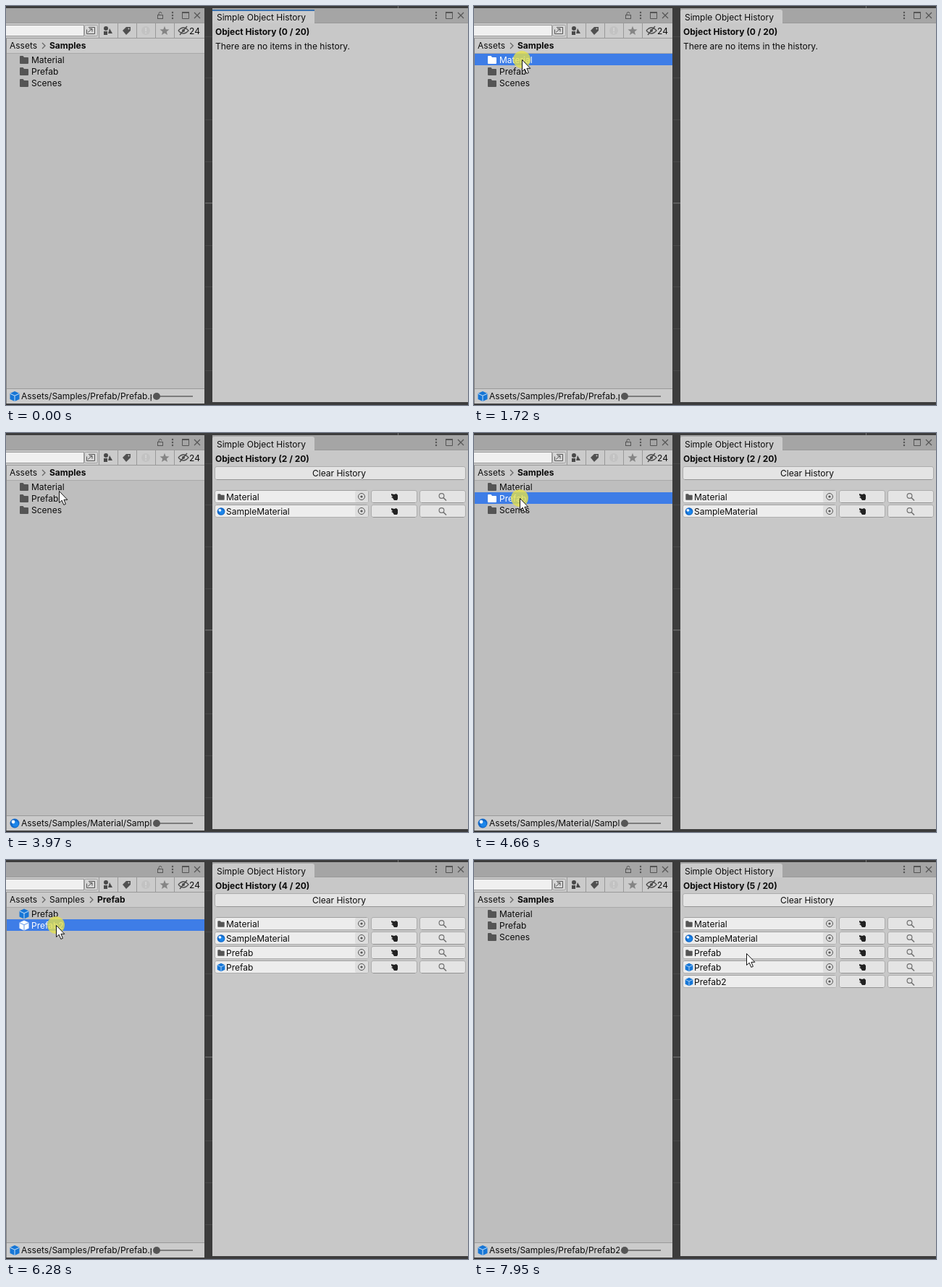
An HTML page that plays this animation: 638x552 px, repeating every 7990 ms.

```html
<!DOCTYPE html>
<html lang="en">
<head>
<meta charset="utf-8">
<title>Object history panel</title>
<style>
html, body { margin: 0; width: 100%; height: 100%; overflow: hidden; background: #3c3c3c; }
svg { display: block; }
text { font: 12px Inter, sans-serif; fill: #0b0b0b; white-space: pre; }
.b { font-weight: 700; }
.w { fill: #fff; }
</style>
</head>
<body>
<svg id="stage" width="638" height="552" viewBox="0 0 638 552">
  <defs>
    <clipPath id="pathClip"><rect x="0" y="530" width="201" height="20"/></clipPath>
  </defs>
  <g id="chrome"></g>
  <g id="view"></g>
  <circle id="press" r="12" fill="#e6e14a" opacity=".78"/>
  <path id="cursor" d="M.5 .5V16.5L4.2 13.2L6.8 19.4L9.4 18.3L6.9 12.3H11.8Z" fill="#fff" stroke="#111"/>
</svg>
<script>
const LOOP = 7990;
const $ = id => document.getElementById(id);

const rect = (x, y, w, h, fill, more = '') =>
  `<rect x="${x}" y="${y}" width="${w}" height="${h}" fill="${fill}" ${more}/>`;
const text = (x, y, s, cls = '', more = '') => `<text x="${x}" y="${y}" class="${cls}" ${more}>${s}</text>`;
const line = (d, color, width = 1) => `<path d="${d}" fill="none" stroke="${color}" stroke-width="${width}"/>`;
const shape = (d, fill) => `<path d="${d}" fill="${fill}"/>`;
const disc = (x, y, r, fill) => `<circle cx="${x}" cy="${y}" r="${r}" fill="${fill}"/>`;
const ring = (x, y, r, color, width = 1) =>
  `<circle cx="${x}" cy="${y}" r="${r}" fill="none" stroke="${color}" stroke-width="${width}"/>`;
const place = (x, y, k, s) => `<g transform="translate(${x} ${y}) scale(${k})">${s}</g>`;

// Icons are centred on the origin
const icons = {
  folder: on => shape('M-6-4.5Q-6-5.5-5-5.5H-1.5L0-3.5H5Q6-3.5 6-2.5V4.5Q6 5.5 5 5.5H-5Q-6 5.5-6 4.5Z', on ? '#fff' : '#555'),
  material: on => on
    ? ring(0, 0, 6, '#fff', 1.2) + disc(-1, -1, 4.5, '#fff')
    : disc(0, 0, 6.5, '#1268c8') + disc(1, 1, 4, '#1c86ea') + disc(-2, -2, 2.4, '#eef6ff'),
  prefab: on => shape('M0-7L6.5-4V4L0 7L-6.5 4V-4Z', on ? '#fff' : '#1676d6') +
    line('M-6.3-3.7L0-.8L6.3-3.7M0-.8V7', on ? '#6f9fec' : '#b9d8f5', 1.1)
};

const folders = {
  Samples: [['folder', 'Material'], ['folder', 'Prefab'], ['folder', 'Scenes']],
  Material: [['material', 'SampleMaterial']],
  Prefab: [['prefab', 'Prefab'], ['prefab', 'Prefab2']]
};
const history = [['folder', 'Material'], ['material', 'SampleMaterial'], ['folder', 'Prefab'],
  ['prefab', 'Prefab'], ['prefab', 'Prefab2']];
const files = ['Prefab/Prefab.prefab', 'Material', 'Material/SampleMaterial.mat', 'Prefab',
  'Prefab/Prefab.prefab', 'Prefab/Prefab2.prefab'];

// start time, open folder, selected row, history size
const states = [
  [0, 'Samples', -1, 0], [1720, 'Samples', 0, 0], [1850, 'Samples', 0, 1],
  [1930, 'Material', -1, 1], [2790, 'Material', 0, 1], [2870, 'Material', 0, 2],
  [3720, 'Samples', -1, 2], [4580, 'Samples', 1, 2], [4710, 'Samples', 1, 3],
  [4790, 'Prefab', -1, 3], [5400, 'Prefab', 0, 3], [5530, 'Prefab', 0, 4],
  [6240, 'Prefab', 1, 4], [6370, 'Prefab', 1, 5], [7060, 'Samples', -1, 5]
];
const presses = [[1720, 1850], [1890, 1930], [2790, 2910], [3640, 3720], [4580, 4710],
  [4750, 4790], [5400, 5570], [6240, 6410], [6980, 7060]];
// time, x, y of the pointer tip
const track = [
  [330, 300, 551], [1100, 67, 75], [1140, 66, 74], [2180, 66, 74], [2420, 73, 77],
  [3300, 73, 77], [3560, 80, 51], [3800, 80, 51], [3970, 73, 80], [4090, 63, 93],
  [4270, 63, 93], [4330, 63, 90], [4920, 63, 90], [5150, 69, 75], [5570, 69, 75],
  [5730, 69, 90], [6380, 69, 90], [6650, 80, 51], [7160, 80, 51], [7750, 345, 150],
  [7950, 376, 129]
];

function button(x, y, w, h) {
  return rect(x + .5, y + .5, w - 1, h - 1, '#e4e4e4', 'rx="2.5" stroke="#adadad"') +
    line(`M${x + 3} ${y + h - .5}h${w - 6}`, '#939393');
}

function windowIcons(x) {
  return [9, 13, 17].map(y => disc(x, y, 1.2, '#555')).join('') +
    line(`M${x + 13.5} 9V17.5H${x + 22.5}V9`, '#555') + rect(x + 13, 8, 10, 2, '#555') +
    line(`M${x + 30} 9l8 8m0-8l-8 8`, '#555', 1.2);
}

function chevron(x) {
  return line(`M${x} 51l4 4-4 4`, '#666', 1.3);
}

function drawChrome() {
  let s = rect(0, 0, 638, 552, '#3c3c3c') + line('M541.5 0V3', '#777');
  for (let y = 41.5; y < 550; y += 57.8) s += line(`M275 ${Math.round(y) + .5}h10`, '#4a4a4a');
  s += line('M275 272.5h10', '#6c6c6c');

  // project panel
  s += rect(0, 3, 274, 547, '#cbcbcb') + rect(0, 3, 274, 20, '#a5a5a5') + rect(0, 23, 274, 1, '#999') +
    rect(0, 44, 274, 1, '#999') + rect(0, 65, 274, 1, '#aaa') + rect(0, 66, 274, 463, '#bebebe') +
    rect(0, 529, 274, 1, '#999') + rect(0, 45, 1, 505, '#858585');
  s += rect(209.5, 12.5, 7, 5, 'none', 'stroke="#555"') + line('M211 12V10.5a2 2 0 0 1 4 0', '#555');
  s += windowIcons(230);
  s += rect(-4.5, 26.5, 112, 15, '#f0f0f0', 'stroke="#999"');
  s += rect(108.5, 26.5, 18, 15, '#d6d6d6', 'rx="2" stroke="#a0a0a0"') +
    line('M114 29.5h8.5v9h-11v-6M113 36.5l6-5m-4 0h4v4', '#555');
  for (const x of [128, 154, 180, 206, 232]) s += rect(x, 24, 1, 20, '#999');
  s += disc(138, 31, 3, '#4a4a4a') + shape('M143 31l4 7h-6z', '#4a4a4a') + rect(135, 35, 5, 5, '#4a4a4a');
  s += shape('M161 34l5-5h6v5l-6 6z', '#505050') + disc(169.5, 31.5, 1, '#cbcbcb');
  s += disc(193, 34, 6, '#c2c2c2') + rect(192.3, 30, 1.5, 5, '#d6d6d6') + rect(192.3, 36.5, 1.5, 1.5, '#d6d6d6');
  const star = Array.from({ length: 10 }, (_, i) => {
    const r = i % 2 ? 2.9 : 6.8, a = i * Math.PI / 5;
    return (219 + r * Math.sin(a)).toFixed(1) + ' ' + (34.5 - r * Math.cos(a)).toFixed(1);
  });
  s += shape(`M${star.join('L')}Z`, '#858585');
  s += line('M238 34q7-8 14 0q-7 8-14 0M240 40l10-12', '#4a4a4a', 1.4) + disc(245, 34, 2, '#4a4a4a');
  s += text(253, 39, '24') + text(5, 59, 'Assets') + chevron(50);
  s += rect(208, 539, 50, 2, '#7c7c7c') + disc(208, 540, 5, '#555');

  // history panel
  s += rect(285, 3, 353, 545, '#c8c8c8') + rect(285, 3, 353, 20, '#a5a5a5') + rect(285, 23, 353, 1, '#999') +
    shape('M285 24V8q0-3 3-3H423q3 0 3 3V24z', '#cbcbcb') +
    rect(285, 5, 141, 2, '#3a72b0', 'id="focus"') + text(291, 20, 'Simple Object History') + windowIcons(594);
  $('chrome').innerHTML = s;
}

function historyRow([icon, name], i) {
  const y = 80 + 20 * i, c = y + 8.5;
  return rect(288.5, y - .5, 212, 17, '#ededed', 'rx="2.5" stroke="#b0b0b0"') +
    line(`M291 ${y - .5}h207`, '#a0a0a0') + rect(482, y, 18, 16, '#dedede', 'rx="2"') +
    ring(491, c - .5, 4.5, '#555') + disc(491, c - .5, 1.6, '#555') +
    place(297, c, icon === 'folder' ? .78 : .82, icons[icon]()) + text(304, y + 13, name) +
    button(504, y - 1, 64, 18) + button(571, y - 1, 64, 18) +
    shape(`M532 ${y + 4}l4 1 3-1 2 2v5l-1 2h-4l-2-3-2-1 2-1-2-2z`, '#222') +
    ring(601.5, y + 7, 3.4, '#707070', 1.2) + line(`M604 ${y + 9.5}l4 4`, '#707070', 1.6);
}

function drawView([, folder, selected, count]) {
  const inside = folder !== 'Samples';
  let s = text(60, 59, 'Samples', inside ? '' : 'b');
  if (inside) s += chevron(116) + text(126, 59, folder, 'b');
  folders[folder].forEach(([icon, name], i) => {
    const on = i === selected, y = 66 + 16 * i;
    if (on) s += rect(1, y, 273, 16, '#3e7de7');
    s += place(25, y + 8.5, 1, icons[icon](on)) + text(35, y + 13, name, on ? 'w' : '');
  });

  const icon = count ? history[count - 1][0] : 'prefab';
  s += place(12, 540, 1, icons[icon]()) +
    text(21, 544, 'Assets/Samples/' + files[count], '', 'clip-path="url(#pathClip)"');

  s += text(289, 40, `Object History (${count} / 20)`, 'b');
  s += count
    ? button(288, 46, 347, 19) + text(460, 60, 'Clear History', '', 'text-anchor="middle"') +
      history.slice(0, count).map(historyRow).join('')
    : text(289, 60, 'There are no items in the history.');
  $('view').innerHTML = s;
}

function pointerAt(t) {
  const i = track.findIndex(k => k[0] > t);
  if (i < 0) return track[track.length - 1].slice(1);
  const [t0, x0, y0] = track[i - 1], [t1, x1, y1] = track[i];
  const u = (t - t0) / (t1 - t0), e = u * u * (3 - 2 * u);
  return [x0 + (x1 - x0) * e, y0 + (y1 - y0) * e];
}

let shown;
function frame() {
  const t = performance.now() % LOOP;
  const state = states.filter(s => s[0] <= t).pop();
  if (state !== shown) drawView(shown = state);
  const moving = t >= track[0][0];
  const [x, y] = moving ? pointerAt(t).map(Math.round) : [0, 0];
  $('focus').style.display = moving ? 'none' : '';
  $('cursor').style.display = moving ? '' : 'none';
  $('cursor').setAttribute('transform', `translate(${x} ${y})`);
  $('press').style.display = presses.some(([a, b]) => t >= a && t < b) ? '' : 'none';
  $('press').setAttribute('transform', `translate(${x} ${y})`);
  requestAnimationFrame(frame);
}

drawChrome();
frame();
</script>
</body>
</html>
```
